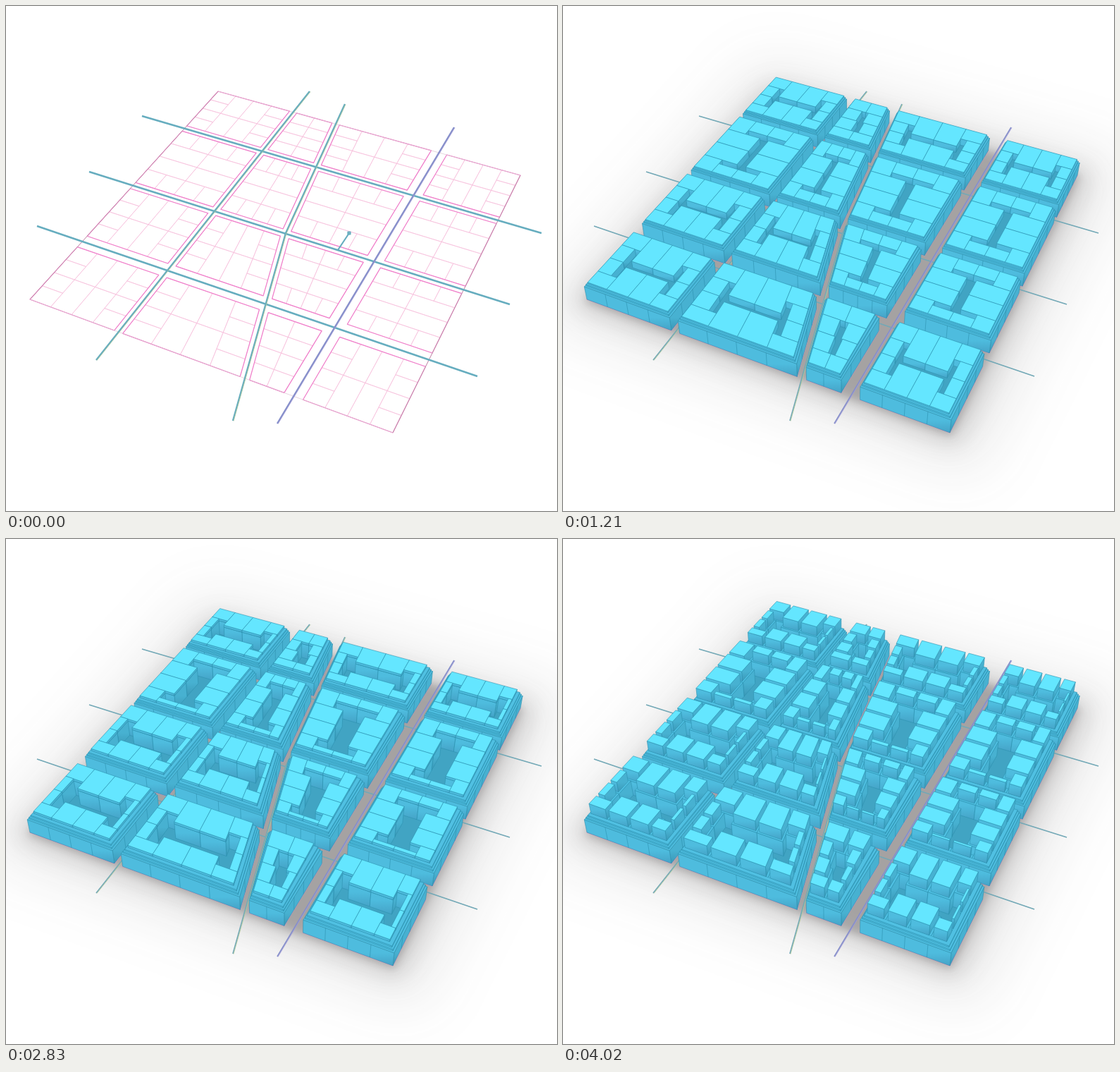
These frames come from a looping animation (782 px wide and 716 px high, 4470 ms). An HTML page with a canvas:

```html
<!DOCTYPE html>
<html lang="en">
<head>
<meta charset="utf-8">
<title>City blocks</title>
<style>
  html, body { margin: 0; width: 782px; height: 716px; overflow: hidden; background: #fff; }
  canvas { display: block; }
</style>
</head>
<body>
<canvas id="stage" width="782" height="716"></canvas>
<script>
const LOOP = 4470, W = 782, H = 716;
const canvas = document.getElementById('stage');
let ctx = canvas.getContext('2d');

// Camera: horizon at y = -1090, vertical vanishing point at (391, 2098).
function toWorld([x, y]) {
  const s = y + 1090;
  return [(x - 391) * 1448 / s, 975 * (2098 - y) / s];
}
function project([X, Y], z = 0) {
  const s = 3108300 / (Y + 975);
  const k = 1 / (1 - z * s / 3408000);
  return [391 + X * s / 1448 * k, 2098 + (s - 3188) * k];
}

// The site outline and the streets that cut it, with half widths in world units.
const back = [301, 121], right = [730, 240], front = [549, 605], left = [34, 416];
const street = (half, ...path) => ({ half, path });
const rows = [
  street(0, back, right),
  street(8, [193, 156], [760, 322]),
  street(8, [118, 235], [715, 423]),
  street(13, [44, 312], [669, 525]),
  street(0, left, front)
];
const cols = [
  street(0, back, left),
  street(6.5, [431, 121], [128, 502]),
  street(6.5, [481, 139], [397, 322], [322, 588]),
  street(13, [636, 172], [385, 592]),
  street(0, right, front)
];

const mix = (a, b, t) => [a[0] + (b[0] - a[0]) * t, a[1] + (b[1] - a[1]) * t];
const at = (q, u, v) => mix(mix(q[0], q[1], u), mix(q[3], q[2], u), v);
const sub = (q, [u0, v0, u1, v1]) => [at(q, u0, v0), at(q, u1, v0), at(q, u1, v1), at(q, u0, v1)];
const dist = (a, b) => Math.hypot(a[0] - b[0], a[1] - b[1]);

function curb({ half, path }, segment, side) {
  const i = Math.min(segment, path.length - 2);
  const a = toWorld(path[i]), b = toWorld(path[i + 1]);
  const k = side * half / dist(a, b);
  const shift = [(b[1] - a[1]) * k, (a[0] - b[0]) * k];
  return [a, b].map(p => [p[0] + shift[0], p[1] + shift[1]]);
}
function meet([a, b], [c, d]) {
  const cross = (p, q, r) => (q[0] - p[0]) * (r[1] - p[1]) - (q[1] - p[1]) * (r[0] - p[0]);
  const ca = cross(c, d, a), cb = cross(c, d, b);
  return mix(a, b, ca / (ca - cb));
}

function makeBlock(r, c) {
  const half = r < 2 ? 0 : 1;
  const top = curb(rows[r], 0, 1), bottom = curb(rows[r + 1], 0, -1);
  const west = curb(cols[c], half, -1), east = curb(cols[c + 1], half, 1);
  const base = [meet(top, west), meet(top, east), meet(bottom, east), meet(bottom, west)];
  const [A, B, C, D] = base;
  const w = (dist(A, B) + dist(D, C)) / 2, h = (dist(A, D) + dist(B, C)) / 2;
  const kind = w < 92 ? 'narrow' : dist(D, C) > h ? 'wide' : 'deep';
  const inset = (l, s) => [l / w, 0, 1 - s / w, 1 - s / h];
  return { base, w, h, kind, step: inset(1.5, 2.5), deck: inset(3, 5), tower: inset(5, 10) };
}
const blocks = [];
for (let r = 0; r < 4; r++) for (let c = 0; c < 4; c++) blocks.push(makeBlock(r, c));

// Each cell has its plot and the smaller body left once the courtyard opens (0 to 1).
function makeCells(kind, open) {
  const cells = [];
  const add = (u, v, w, h, cut = [0, 0, 0, 0]) => {
    const plot = [u, v, u + w, v + h];
    cells.push({ plot, body: plot.map((n, i) => n + cut[i]) });
  };
  const slot = open && 0.03 + 0.09 * open, bar = 0.13 * open;
  const sideCut = (u, cut) => u ? [cut, 0, 0, 0] : [0, 0, -cut, 0];
  for (let r = 0; r < 4; r++) {
    const mid = r % 3 > 0;
    if (kind === 'narrow') {
      for (const u of [0, 0.5]) add(u, r / 4, 0.5, 0.25, sideCut(u, mid ? slot + (u ? r === 2 : r === 1) * bar / 2 : 0));
    } else {
      for (const u of [0, 0.75]) add(u, r / 4, 0.25, 0.25, sideCut(u, mid ? slot : 0));
      if (mid) {
        add(r / 4, 0, 0.25, 0.5, [0, 0, 0, -bar]);
        add(r / 4, 0.5, 0.25, 0.5, [0, bar, 0, 0]);
      }
    }
  }
  const turn = ([a, b, c, d]) => [b, a, d, c];
  if (kind === 'deep') for (const c of cells) { c.plot = turn(c.plot); c.body = turn(c.body); }
  const depth = ({ body: b }) => b[0] + b[1] + b[2] + b[3];
  return cells.sort((a, b) => depth(a) - depth(b));
}
const clip = (cell, bounds) => cell.map((n, i) => i < 2 ? Math.max(n, bounds[i]) : Math.min(n, bounds[i]));
function shrink(cell, { w, h }, gap) {
  const d = [gap / w, gap / h];
  return cell.map((n, i) => n < 0.01 || n > 0.99 ? n : n + (i < 2 ? d[i] : -d[i - 2]));
}

function trace(points, close = true) {
  ctx.beginPath();
  points.forEach(([x, y], i) => i ? ctx.lineTo(x, y) : ctx.moveTo(x, y));
  if (close) ctx.closePath();
}
function stroke(color, width) {
  ctx.strokeStyle = color;
  ctx.lineWidth = width;
  ctx.stroke();
}
function line(points, color, width) {
  trace(points, false);
  stroke(color, width);
}
function outline(q, z, color, width) {
  trace(q.map(p => project(p, z)));
  stroke(color, width);
}
const post = (p, z0, z1, color) => line([project(p, z0), project(p, z1)], color, 0.6);

const PODIUM = 24, STEP = 26.5, DECK = 29;
const EDGE = '#2d91af', ROOF = '#64e6ff', LEDGE = '#50c0e2', FLOOR = '#41a4c3';

function flat(q, z, fill) {
  trace(q.map(p => project(p, z)));
  ctx.fillStyle = fill;
  ctx.fill();
  stroke(EDGE, 0.6);
}
function wall(a, b, z0, z1, light, dark) {
  const pts = [project(a, z1), project(b, z1), project(b, z0), project(a, z0)];
  const g = ctx.createLinearGradient(0, pts[1][1], 0, pts[2][1] + 0.1);
  g.addColorStop(0, light);
  g.addColorStop(1, dark);
  trace(pts);
  ctx.fillStyle = g;
  ctx.fill();
  stroke(EDGE, 0.6);
}
function prism(q, z0, z1, top = ROOF) {
  if (z1 > z0) {
    wall(q[1], q[2], z0, z1, '#47b1d1', '#3b98b7');
    wall(q[3], q[2], z0, z1, '#4ebcde', '#45a3c7');
  }
  flat(q, z1, top);
}

function drawPlan(bare) {
  for (const b of blocks) {
    if (bare) for (const c of makeCells(b.kind, 0)) outline(sub(b.base, c.plot), 0, '#f6bfdb', 0.7);
    outline(b.base, 0, bare ? '#f07fcb' : '#ee8fc4', 1.2);
  }
  if (bare) {
    line([back, right, front, left, back], '#dcc3d0', 0.7);
    line([back, left], '#c58aab', 1);
    line([right, front], '#c58aab', 1);
  }
  const teal = bare ? '#66adbf' : '#72a8b6', width = bare ? 2.4 : 1.7;
  for (const { path } of rows.slice(1, 4)) line(path, teal, width);
  cols.slice(1, 4).forEach(({ path }, i) => {
    const violet = i === 2;
    line(path, violet ? '#858fca' : teal, width);
    line(path.map(([x, y]) => [x + 1, y + 0.5]), violet ? '#a39cd6' : '#b3c99b', 0.8);
  });
  if (bare) {
    line([[471, 346], [487, 322]], teal, 2.2);
    ctx.strokeRect(485.5, 320.5, 3, 3);
  }
}

function makeGround() {
  const sheet = document.createElement('canvas');
  sheet.width = W;
  sheet.height = H;
  ctx = sheet.getContext('2d');
  ctx.fillStyle = '#fff';
  ctx.fillRect(0, 0, W, H);
  const glow = (grow, drop, blur, color) => {
    ctx.filter = `blur(${blur}px)`;
    trace([back, right, front, left].map(([x, y]) => [391 + (x - 391) * grow, 350 + (y - 350) * grow + drop]));
    ctx.fillStyle = color;
    ctx.fill();
  };
  glow(1.22, 6, 42, 'rgba(60,60,62,.1)');
  glow(1.06, 2, 17, 'rgba(60,56,56,.2)');
  glow(1.01, 2, 6, 'rgba(66,60,60,.26)');
  ctx.filter = 'none';
  drawPlan(false);
  ctx = canvas.getContext('2d');
  return sheet;
}
const ground = makeGround();

function drawWire(b, cells) {
  const green = '#00c81e';
  for (const { plot } of cells) {
    const low = sub(b.base, plot);
    outline(low, 0, green, 0.6);
    outline(low, PODIUM, green, 0.6);
    outline(sub(b.base, clip(plot, b.deck)), DECK, green, 0.8);
    low.forEach(p => post(p, 0, PODIUM, green));
  }
  outline(b.base, PODIUM, green, 1);
  outline(sub(b.base, b.step), STEP, green, 1);
  outline(sub(b.base, b.tower), DECK, green, 1);
  outline(sub(b.base, b.deck), DECK, green, 1.2);
}

function drawBlock(b, { wire, open, height, gap }) {
  const cells = makeCells(b.kind, open);
  const place = (cell, bounds) => sub(b.base, clip(cell, bounds));
  const raised = height > DECK, depth = open * 27;

  prism(b.base, 0, PODIUM, LEDGE);
  const parts = b.kind === 'narrow' ? 2 : 4;
  for (let i = 1; i < 4; i++) {
    post(at(b.base, 1, i / 4), 0, PODIUM, EDGE);
    if (i < parts) post(at(b.base, i / parts, 1), 0, PODIUM, EDGE);
  }
  prism(sub(b.base, b.step), PODIUM, STEP, LEDGE);
  prism(sub(b.base, b.deck), STEP, DECK, raised ? LEDGE : ROOF);

  const bounds = raised ? b.tower : b.deck;
  const plan = sub(b.base, bounds);
  ctx.save();
  trace(plan.map(p => project(p, DECK)));
  ctx.clip();
  if (depth) flat(plan, DECK - depth, FLOOR);
  for (const c of cells) prism(place(c.body, bounds), DECK - depth, DECK, raised ? LEDGE : ROOF);
  ctx.restore();
  if (raised) for (const c of cells) prism(place(shrink(c.body, b, gap), bounds), DECK, height);
  if (wire) drawWire(b, cells);
}

const DIG = [680, 850, 1010, 1210, 1380, 1550, 1820, 2030, 2220];
const passed = t => DIG.filter(s => t >= s).length;
const steps = (t, from, every, max) => Math.max(0, Math.min(max, Math.floor((t - from) / every) + 1));

function stateAt(t) {
  const rise = steps(t, 2660, 170, 6);
  return {
    bare: t < 230,
    wire: t < 250,
    open: passed(t) / DIG.length,
    height: rise ? 26 + rise * 3.5 : DECK,
    gap: steps(t, 3830, 190, 2) * 1.4
  };
}

function draw(state) {
  ctx.lineJoin = 'round';
  if (state.bare) {
    ctx.fillStyle = '#fff';
    ctx.fillRect(0, 0, W, H);
    drawPlan(true);
    return;
  }
  ctx.drawImage(ground, 0, 0);
  for (const b of blocks) drawBlock(b, state);
}

let shown = '';
const start = performance.now();
function tick() {
  const state = stateAt((performance.now() - start) % LOOP);
  const key = JSON.stringify(state);
  if (key !== shown) {
    draw(state);
    shown = key;
  }
  requestAnimationFrame(tick);
}
tick();
</script>
</body>
</html>
```
